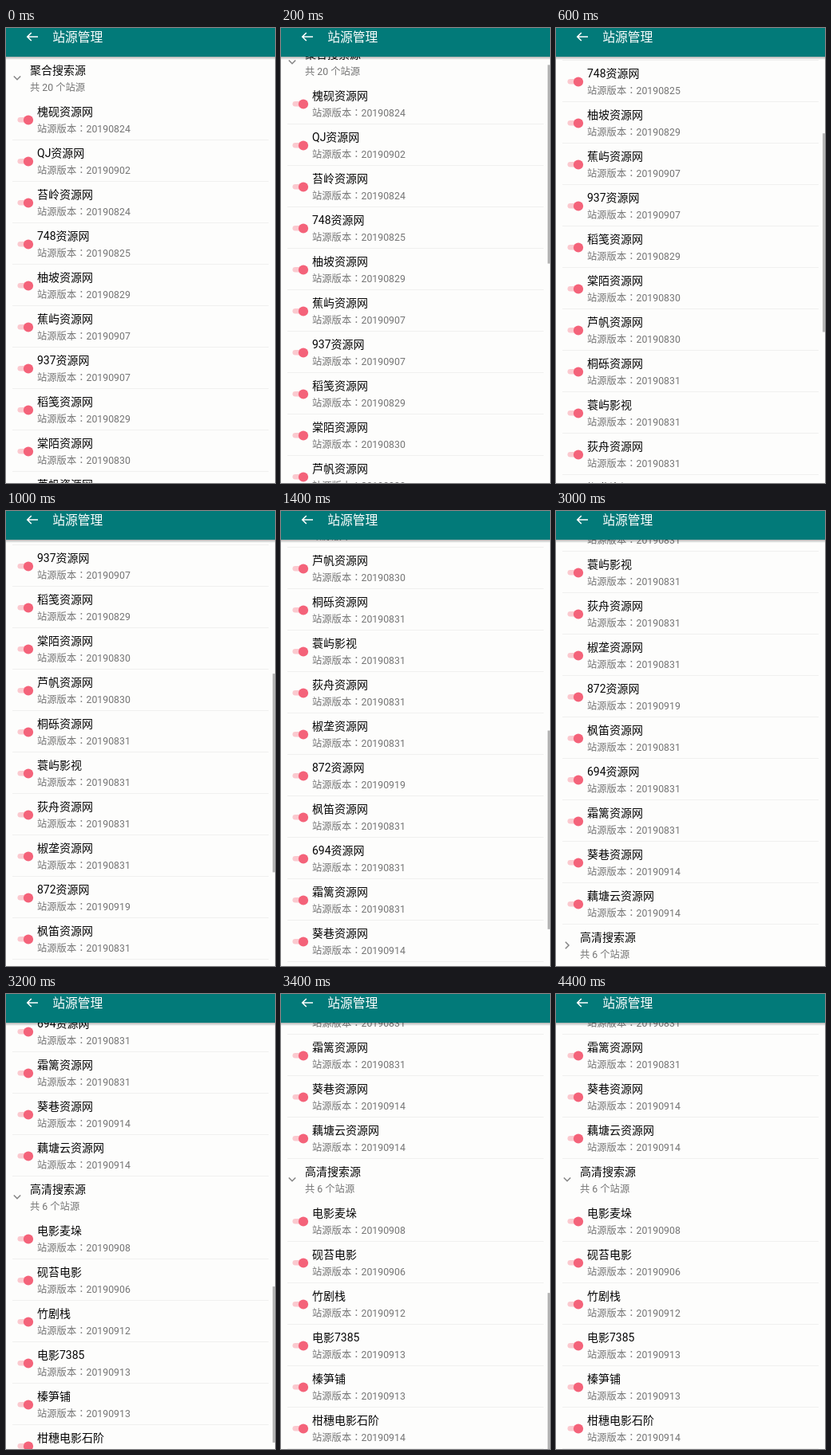
These frames come from a looping animation (337 by 571 pixels, 5 s). An HTML page:

```html
<!DOCTYPE html>
<html lang="zh-CN">
<head>
<meta charset="utf-8">
<title>站源管理</title>
<style>
html, body { margin: 0; width: 100%; height: 100%; overflow: hidden; background: #fdfdfc; }
svg { display: block; width: 337px; height: 571px; }
text { font-family: Roboto, "Noto Sans CJK SC", "Noto Sans CJK", sans-serif; white-space: pre; }
.name { font-size: 14px; font-weight: 500; fill: #060606; }
.name .latin { font-weight: 400; }
.sub { font-size: 12.3px; fill: #757575; }
.colon { font-family: "Noto Sans CJK TC", "Noto Sans CJK", sans-serif; }
.title { font-size: 15.8px; font-weight: 500; fill: #fff; }
</style>
</head>
<body>
<svg viewBox="0 0 337 571">
  <defs>
    <clipPath id="view"><rect y="36" width="337" height="535"/></clipPath>
    <linearGradient id="shade" x2="0" y2="1">
      <stop offset="0" stop-color="#000" stop-opacity=".3"/>
      <stop offset="1" stop-color="#000" stop-opacity="0"/>
    </linearGradient>
  </defs>
  <rect width="337" height="571" fill="#fdfdfc"/>
  <g clip-path="url(#view)">
    <g id="list"></g>
    <rect id="bar" x="334" width="3" fill="#b6b6b6"/>
  </g>
  <rect y="36" width="337" height="4" fill="url(#shade)"/>
  <rect width="337" height="36" fill="#027a79"/>
  <path d="M40 11H27M31.8 6L26.8 11L31.8 16" fill="none" stroke="#fff" stroke-width="1.6"/>
  <text class="title" x="58.2" y="16.8">站源管理</text>
</svg>
<script>
const ROW = 52, TOP = 37, VIEW = 534, LOOP = 5000, STEP = 200;

const groups = [
  { name: "聚合搜索源", items: [
    ["槐砚资源网", "0824"], ["QJ资源网", "0902"], ["苔岭资源网", "0824"], ["748资源网", "0825"],
    ["柚坡资源网", "0829"], ["蕉屿资源网", "0907"], ["937资源网", "0907"], ["稻笺资源网", "0829"],
    ["棠陌资源网", "0830"], ["芦帆资源网", "0830"], ["桐砾资源网", "0831"], ["蓑屿影视", "0831"],
    ["荻舟资源网", "0831"], ["椒垄资源网", "0831"], ["872资源网", "0919"], ["枫笛资源网", "0831"],
    ["694资源网", "0831"], ["霜篱资源网", "0831"], ["葵巷资源网", "0914"], ["藕塘云资源网", "0914"]
  ] },
  { name: "高清搜索源", items: [
    ["电影麦垛", "0908"], ["砚苔电影", "0906"], ["竹剧栈", "0912"],
    ["电影7385", "0913"], ["榛笋铺", "0913"], ["柑穗电影石阶", "0914"]
  ] }
];

// [start ms, scroll offset, scrollbar opacity]
const steps = [
  [0, 0, 0], [200, 20, 1], [400, 90, 1], [600, 204, 1], [800, 358, 1],
  [1200, 358, .5], [1400, 511, 1], [1600, 610, 1], [2000, 610, .5],
  [2200, 610, 0], [3200, 900, 1], [3400, 922, 1], [3800, 922, .5], [4000, 922, 0]
];
const OPEN_AT = 3200;

const list = document.getElementById("list");
const bar = document.getElementById("bar");

const text = (cls, x, y, body) => `<text class="${cls}" x="${x}" y="${y}">${body}</text>`;
const latin = s => s.replace(/[A-Z0-9]+/g, `<tspan class="latin">$&</tspan>`);

function header(group, y, id) {
  return text("name", 30, y + 5, group.name) +
    text("sub", 30, y + 26, `共 ${group.items.length} 个站源`) +
    `<path id="${id}" fill="none" stroke="#858585" stroke-width="1.5"/>`;
}

function item([name, date], y) {
  return `<rect x="14.5" y="${y + 7}" width="17" height="6.6" rx="3.3" fill="#fbc9cf"/>` +
    `<circle cx="28" cy="${y + 10.5}" r="6.1" fill="#f4637a"/>` +
    text("name", 39, y + 5, latin(name)) +
    text("sub", 39, y + 26, `站源版本<tspan class="colon" lang="zh-TW">：</tspan>2019${date}`) +
    `<rect x="8" y="${y + 35}" width="321" height="1" fill="#f0f0ef"/>`;
}

function build() {
  let y = 53;
  list.innerHTML = groups.map((group, g) => {
    const head = header(group, y, "arrow" + g);
    y += ROW;
    const rows = group.items.map(it => {
      const row = item(it, y);
      y += ROW;
      return row;
    }).join("");
    return head + `<g id="items${g}">${rows}</g>`;
  }).join("");
}

function setArrow(g, y, open) {
  const d = open ? `M9.8 ${y + 7.5}l4.2 4.2l4.2 -4.2` : `M11.8 ${y + 5.8}l4.2 4.2l-4.2 4.2`;
  document.getElementById("arrow" + g).setAttribute("d", d);
}

function draw(ms) {
  const t = Math.floor((ms % LOOP) / STEP) * STEP;
  const [, scroll, alpha] = steps.filter(s => s[0] <= t).pop();
  const open = t >= OPEN_AT;
  const total = ROW * (22 + (open ? 6 : 0));

  list.setAttribute("transform", `translate(0 ${-scroll})`);
  document.getElementById("items1").style.display = open ? "" : "none";
  setArrow(0, 53, true);
  setArrow(1, 53 + ROW * 21, open);

  bar.setAttribute("y", TOP + scroll * VIEW / total);
  bar.setAttribute("height", VIEW * VIEW / total);
  bar.setAttribute("opacity", alpha);
}

build();
const start = performance.now();
function tick() {
  draw(performance.now() - start);
  requestAnimationFrame(tick);
}
draw(0);
requestAnimationFrame(tick);
</script>
</body>
</html>
```
